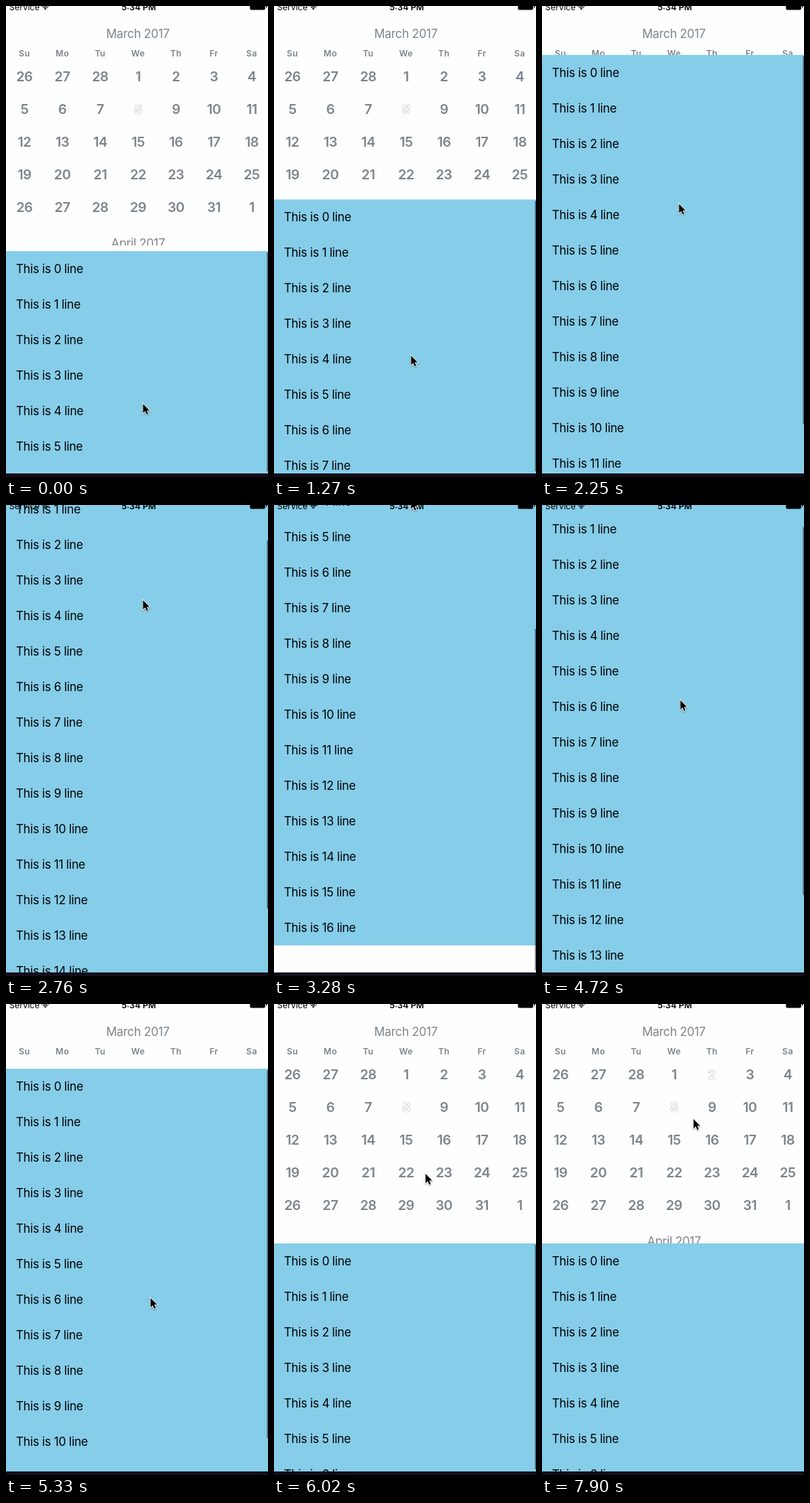
These frames come from a looping animation (370 px wide and 663 px high, 8000 ms). An HTML page with a canvas:

```html
<!DOCTYPE html>
<html lang="en">
<head>
<meta charset="utf-8">
<title>Calendar with sliding list</title>
<style>
html, body { margin: 0; width: 100%; height: 100%; overflow: hidden; background: #fff; }
canvas { display: block; width: 370px; height: 663px; }
</style>
</head>
<body>
<canvas id="stage"></canvas>
<script>
const W = 370, H = 663, LOOP = 8000, SCREEN_BOTTOM = 658, CALENDAR_BOTTOM = 337;
const ROWS = 17, ROW_HEIGHT = 50, SCROLL_END = SCREEN_BOTTOM - ROWS * ROW_HEIGHT;
const OVERSCROLL = 38, PAUSE_TOP = 20;
const GRAY = '#7c848b', FONT = 'Inter, Roboto, sans-serif';

const canvas = document.getElementById('stage');
const ctx = canvas.getContext('2d');
const scale = window.devicePixelRatio || 1;
canvas.width = W * scale;
canvas.height = H * scale;

const linear = u => u;
const smooth = u => u * u * (3 - 2 * u);
const easeOut = power => u => 1 - (1 - u) ** power;

// Distance covered at time t by a move that lasts from start to end.
function glide(t, start, end, distance, ease = smooth) {
  const u = Math.min(1, Math.max(0, (t - start) / (end - start)));
  return distance * ease(u);
}

// Travel of the list while a finger pulls or flicks it.
function dragged(t) {
  return glide(t, 980, 1380, -79)
    + glide(t, 1740, 2530, -255, easeOut(1.3))
    + glide(t, 2530, 3280, SCROLL_END - OVERSCROLL - 3, linear)
    + glide(t, 4085, 4980, PAUSE_TOP - SCROLL_END, linear)
    + glide(t, 5220, 6020, CALENDAR_BOTTOM - PAUSE_TOP, easeOut(1.7));
}

// Springing back from both ends of the scroll range.
function bounce(t) {
  return 8 - glide(t, 60, 560, 8, easeOut(3)) + glide(t, 3420, 3800, OVERSCROLL, easeOut(2));
}

const listTop = t => CALENDAR_BOTTOM + dragged(t) + bounce(t) - OVERSCROLL * (t > 3800)
  + OVERSCROLL * (t > 3800);

// The pointer outruns the list a little and moves freely between drags.
function cursorY(t) {
  const free = glide(t, 3420, 4060, 152)
    + glide(t, 5450, 6020, -433)
    + glide(t, 6080, 6400, -33)
    + glide(t, 6860, 7300, -174)
    + glide(t, 7300, 7660, 62)
    + glide(t, 7720, 7900, 68, linear);
  return Math.max(-7.5, 560 + 1.05 * dragged(t) + free);
}

const cursorX = t => 193.5 + glide(t, 3420, 4140, -5.5) + glide(t, 4200, 6020, 26, linear);

const scrollbarAlpha = t =>
  1 - glide(t, 250, 560, 1) + glide(t, 960, 1010, 1) - glide(t, 6300, 6700, 1);

function setFont(size, weight, color, spacing, align) {
  ctx.font = `${weight} ${size}px ${FONT}`;
  ctx.letterSpacing = spacing + 'px';
  ctx.fillStyle = color;
  ctx.textAlign = align;
}

function drawCalendar(t) {
  setFont(16.8, 400, GRAY, -0.25, 'center');
  ctx.fillText('March 2017', 186.2, 45);
  ctx.save();
  ctx.beginPath();
  ctx.rect(0, 0, W, CALENDAR_BOTTOM);
  ctx.clip();
  if (t < 3000 || t > 6200) ctx.fillText('April 2017', 186.5, 340);
  ctx.restore();

  const columnX = i => 26 + i * 53.5;
  setFont(12, 600, GRAY, 0.3, 'center');
  ['Su', 'Mo', 'Tu', 'We', 'Th', 'Fr', 'Sa'].forEach((day, i) =>
    ctx.fillText(day, columnX(i), 70.5));

  setFont(19, 600, GRAY, -0.5, 'center');
  for (let i = 0; i < 35; i++) {
    const n = i - 2, day = n < 1 ? n + 28 : n > 31 ? n - 31 : n;
    const x = columnX(i % 7), y = 106 + Math.floor(i / 7) * 46;
    if (n === 8 || (n === 2 && t >= 7800)) drawSelected(day, x, y);
    else ctx.fillText(day, x, y);
  }
}

// A selected day turns white, leaving only a hairline rim.
function drawSelected(day, x, y) {
  ctx.save();
  ctx.strokeStyle = '#858b91';
  ctx.lineWidth = 0.6;
  ctx.strokeText(day, x, y);
  ctx.fillStyle = '#fff';
  ctx.fillText(day, x, y);
  ctx.restore();
}

function drawList(top) {
  ctx.fillStyle = '#86cde9';
  ctx.fillRect(0, top, W, ROWS * ROW_HEIGHT);
  setFont(16.8, 400, '#000', -0.3, 'left');
  for (let i = 0; i < ROWS; i++)
    ctx.fillText(`This is ${i} line`, 14, top + i * ROW_HEIGHT + 31);
}

function drawScrollbar(top, alpha) {
  const overscroll = Math.max(0, SCROLL_END - top);
  const start = top > 0 ? top + 2 : 2 - 0.7 * Math.max(top, SCROLL_END) + overscroll;
  const end = Math.min(655, start + 518);
  ctx.fillStyle = `rgba(0, 0, 0, ${0.5 * alpha})`;
  ctx.fillRect(368.5, start, 1.5, end - start);
}

function drawStatusBar() {
  setFont(12, 400, '#000', 0, 'left');
  ctx.fillText('Service', 4.5, 5.5);
  setFont(12, 600, '#000', 0, 'center');
  ctx.fillText('5:34 PM', 187.5, 5.5);

  const fan = radius => ctx.arc(55.5, 5.5, radius, -Math.PI * 0.75, -Math.PI * 0.25);
  ctx.strokeStyle = '#000';
  ctx.lineWidth = 1.6;
  for (const radius of [4.3, 7]) {
    ctx.beginPath();
    fan(radius);
    ctx.stroke();
  }
  ctx.beginPath();
  ctx.moveTo(55.5, 5.5);
  fan(2.5);
  ctx.fill();

  ctx.beginPath();
  ctx.roundRect(344.5, -5, 21.5, 10.5, 2);
  ctx.roundRect(367, -2, 1.5, 4.5, 0.7);
  ctx.fill();
}

const arrow = new Path2D('M0 0V16L3.8 12.5L6.4 18.4L9 17.3L6.4 11.5H11.4Z');
function drawCursor(x, y) {
  ctx.save();
  ctx.translate(x, y);
  ctx.scale(0.82, 0.82);
  ctx.shadowColor = 'rgba(0, 0, 0, .35)';
  ctx.shadowBlur = 2 * scale;
  ctx.shadowOffsetY = scale;
  ctx.strokeStyle = '#fff';
  ctx.lineWidth = 2;
  ctx.stroke(arrow);
  ctx.shadowColor = 'transparent';
  ctx.fillStyle = '#000';
  ctx.fill(arrow);
  ctx.restore();
}

function draw(now) {
  const t = now % LOOP, top = listTop(t);
  ctx.setTransform(scale, 0, 0, scale, 0, 0);
  ctx.fillStyle = '#fefefe';
  ctx.fillRect(0, 0, W, H);
  drawCalendar(t);
  drawList(top);
  drawScrollbar(top, scrollbarAlpha(t));
  drawStatusBar();
  ctx.fillStyle = '#130e1a';
  ctx.fillRect(0, SCREEN_BOTTOM, W, H - SCREEN_BOTTOM);
  drawCursor(cursorX(t), cursorY(t));
}

const startTime = performance.now();
function tick() {
  draw(performance.now() - startTime);
  requestAnimationFrame(tick);
}
tick();
</script>
</body>
</html>
```
